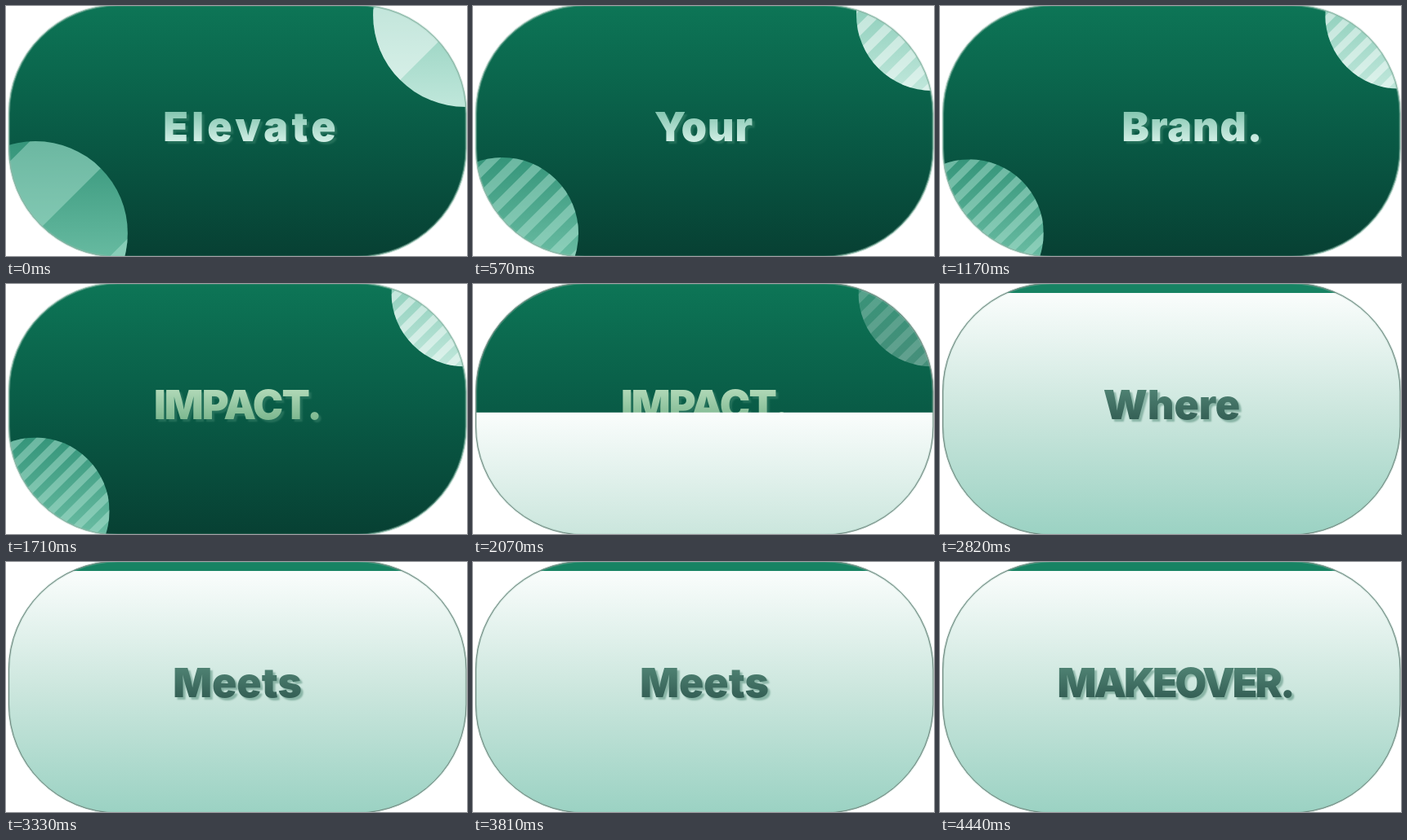
Recreate the animation shown at these times as an HTML page with a canvas. Size 564 px wide and 307 px high, loop 4.5 s.

```html
<!DOCTYPE html>
<html lang="en">
<head>
<meta charset="utf-8">
<title>Word sequence</title>
<style>
html, body { margin: 0; width: 100%; height: 100%; overflow: hidden; background: #fff; }
canvas { display: block; }
</style>
</head>
<body>
<canvas id="stage" width="564" height="307"></canvas>
<script>
const ctx = document.getElementById('stage').getContext('2d');
const W = 564, H = 307, LOOP = 4500, PANEL_TOP = 11;

// Start time, text, centre x, letter spacing
const words = [
  [0, 'Elevate', 283, 0],
  [500, 'Your', 282, 1],
  [1000, 'Brand.', 308.5, 1],
  [1620, 'IMPACT.', 284, -1.8],
  [2340, 'Where', 283.5, 0],
  [3300, 'Meets', 283, 0],
  [4080, 'MAKEOVER.', 289, -3]
];

const clamp = v => Math.max(0, Math.min(1, v));
const progress = (t, from, to) => clamp((t - from) / (to - from));
const smooth = p => p * p * (3 - 2 * p);

function vertical(y0, y1, ...colors) {
  const g = ctx.createLinearGradient(0, y0, 0, y1);
  colors.forEach((c, i) => g.addColorStop(i / (colors.length - 1), c));
  return g;
}

function pill() {
  ctx.beginPath();
  ctx.roundRect(3.5, -1, 559.5, 309, 133);
}

function stripedDisc(x, y, r, band, top, bottom, stripe) {
  ctx.save();
  ctx.beginPath();
  ctx.arc(x, y, r, 0, 7);
  ctx.clip();
  ctx.fillStyle = vertical(y - r, y + r, top, bottom);
  ctx.fillRect(x - r, y - r, 2 * r, 2 * r);
  ctx.translate(x, y);
  ctx.rotate(-Math.PI / 4);
  ctx.fillStyle = stripe;
  const n = Math.ceil(r / band / 2);
  for (let i = -n; i <= n; i++) ctx.fillRect(-r, (2 * i - 1) * band, 2 * r, band);
  ctx.restore();
}

function drawWord(t) {
  const [start, text, center, tracking] = words.findLast(w => w[0] <= t);
  const settle = start === 0 ? Math.exp(-t / 260) : 0;
  const spacing = tracking + 4.3 * settle;
  const x = center + 15 * settle + spacing / 2;
  const light = start >= 2340;
  ctx.font = '900 50px Inter, sans-serif';
  ctx.textAlign = 'center';
  ctx.letterSpacing = spacing + 'px';
  ctx.shadowColor = light ? 'rgba(70,130,110,.5)' : 'rgba(75,145,120,.4)';
  ctx.shadowOffsetX = ctx.shadowOffsetY = 3;
  ctx.shadowBlur = 2;
  ctx.fillStyle = light ? vertical(129, 167, '#4f8273', '#345f55')
    : text === 'IMPACT.' ? vertical(129, 167, '#b1d9b8', '#7cb78f')
    : vertical(129, 167, '#82c5af', '#d2efe6');
  ctx.fillText(text, x, 166);
  ctx.shadowColor = 'transparent';
}

function draw(t) {
  const slide = smooth(progress(t, 1890, 2250));
  const panelY = H + (PANEL_TOP - H) * slide;
  const onLight = t >= 2340;

  ctx.clearRect(0, 0, W, H);
  ctx.save();
  pill();
  ctx.clip();

  ctx.fillStyle = vertical(0, H, '#0d7556', '#095b46', '#074033');
  ctx.fillRect(0, 0, W, H);
  ctx.globalAlpha = progress(t, 2070, 2820);
  ctx.fillStyle = '#178363';
  ctx.fillRect(0, 0, W, H);

  ctx.globalAlpha = 1 - progress(t, 1890, 2160);
  const r = 90.5 + 22.5 * Math.exp(-t / 260);
  const band = 9 + 76 * Math.exp(-t / 160);
  stripedDisc(36, 279, r, band, '#35957a', '#84d0b7', 'rgba(190,235,220,.4)');
  stripedDisc(562, 11, r, band, '#68bca3', '#c0e7db', 'rgba(255,255,255,.45)');
  ctx.globalAlpha = 1;

  if (!onLight) drawWord(t);
  ctx.fillStyle = vertical(panelY, panelY + H - PANEL_TOP, '#fafdfc', '#cbe6dd', '#9bd2c3');
  ctx.fillRect(0, panelY, W, H);
  if (onLight) drawWord(t);
  ctx.restore();

  pill();
  ctx.lineWidth = 3;
  ctx.strokeStyle = 'rgba(150,190,175,.35)';
  ctx.stroke();
  ctx.lineWidth = 1;
  ctx.strokeStyle = slide < .5 ? '#86b5a3' : '#71877f';
  ctx.stroke();
}

function frame() {
  draw(performance.now() % LOOP);
  requestAnimationFrame(frame);
}
frame();
</script>
</body>
</html>
```
